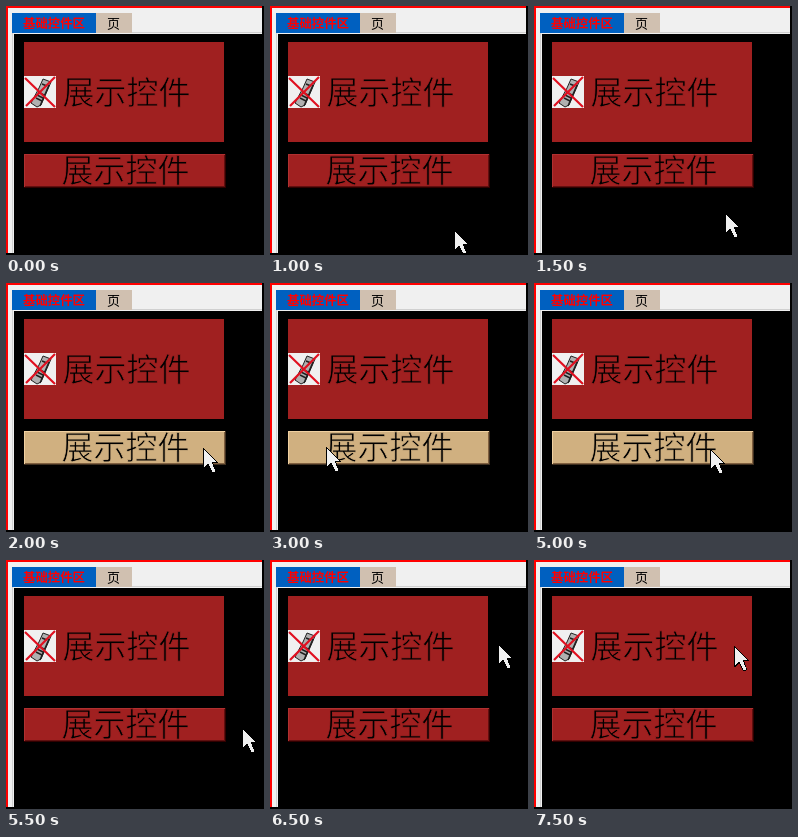
Animation of 258 by 249 pixels, one loop 8000 ms. Source, as an HTML page:

```html
<!DOCTYPE html>
<html lang="zh-CN">
<head>
<meta charset="utf-8">
<title>展示控件</title>
<style>
  html, body { margin: 0; width: 100%; height: 100%; overflow: hidden; background: #000; }
  svg { display: block; width: 258px; height: 249px; --face: #a02020; }
  text { font-family: "Noto Sans CJK SC", "Noto Sans CJK", sans-serif; font-size: 13px; }
  /* A stroke in the face colour thins the glyphs. */
  .big { font-size: 32px; font-weight: 300; stroke: var(--face); stroke-width: .8px; }
  .crisp { shape-rendering: crispEdges; }
  #button { --light: #b03030; --shade: #601010; --dark: #300000; }
  #button.hover { --face: #d0b080; --light: #f0d0a0; --shade: #806040; --dark: #403020; }
</style>
</head>
<body>
<svg viewBox="0 0 258 249">
  <g class="crisp">
    <rect width="258" height="249"/>
    <rect x="2" y="2" width="254" height="26" fill="#f0f0f0"/>
    <rect x="2" y="28" width="6" height="219" fill="#f0f0f0"/>
    <path d="M256 26.5H6.5V247" fill="none" stroke="#d0d0d0"/>
    <rect x="6" y="7" width="84" height="20" fill="#0060c0"/>
    <rect x="90" y="7" width="36" height="20" fill="#d0c0b0"/>
    <rect x="18" y="36" width="200" height="100" fill="var(--face)"/>
  </g>
  <text x="17" y="22" fill="#f00" font-weight="700" style="font-size:12.4px">基础控件区</text>
  <text x="101" y="22">页</text>

  <g transform="translate(18 70)">
    <rect class="crisp" width="32" height="32" fill="#f0f0f0"/>
    <path d="M19 3L27 6L24 13L17 29L13 31L7 27L15 12Z" fill="#b0b0b0" stroke="#202020"/>
    <path d="M18 8l5 2M14 16l6 3m-7 0l6 3m-7 0l6 3M25 9L16 30" fill="none" stroke="#202020" stroke-width="1.5"/>
    <path d="M1 2L31 31M31 1L2 30" stroke="#e01020" stroke-width="2.2"/>
  </g>
  <text class="big" x="56.5" y="98">展示控件</text>

  <g id="button">
    <g class="crisp">
      <rect x="18" y="148" width="202" height="34" fill="var(--dark)"/>
      <path d="M18 148h201v1h-200v32h-1z" fill="var(--light)"/>
      <rect x="19" y="149" width="200" height="32" fill="var(--shade)"/>
      <rect x="19" y="149" width="199" height="31" fill="var(--face)"/>
    </g>
    <text class="big" x="55.5" y="176">展示控件</text>
  </g>

  <g id="cursor" class="crisp">
    <path d="M0 0L15 15H10L13 23L12 25H9L5 17.5L1 21H0Z"/>
    <path d="M1 1.5L13 13.5V14H8.5L12 22.5V23L11 24H9.5L5.5 15.5L1 19.5Z" fill="#f0f0f0"/>
  </g>
  <g class="crisp">
    <path d="M0 0H256V2H2V247H0Z" fill="#f00"/>
    <path d="M256 0H258V249H0V247H256Z"/>
  </g>
</svg>
<script>
  const STEP = 500;
  // Pointer tip at each step; null while it is off stage.
  const path = [
    null, [218, 234], [184, 224], [191, 207],
    [197, 165], [156, 165], [56, 164], [26, 161],
    [24, 161], [49, 164], [176, 166], [236, 168],
    [240, 113], [228, 84], [213, 85], [200, 86]
  ];
  const cursor = document.getElementById("cursor");
  const button = document.getElementById("button");
  const inside = ([x, y]) => x >= 18 && x < 220 && y >= 148 && y < 182;
  const start = performance.now();

  function draw(now) {
    const time = Math.max(0, now - start);
    const tip = path[Math.floor(time / STEP) % path.length];
    cursor.style.display = tip ? "" : "none";
    if (tip) cursor.setAttribute("transform", `translate(${tip})`);
    button.classList.toggle("hover", !!tip && inside(tip));
    requestAnimationFrame(draw);
  }
  draw(start);
</script>
</body>
</html>
```
